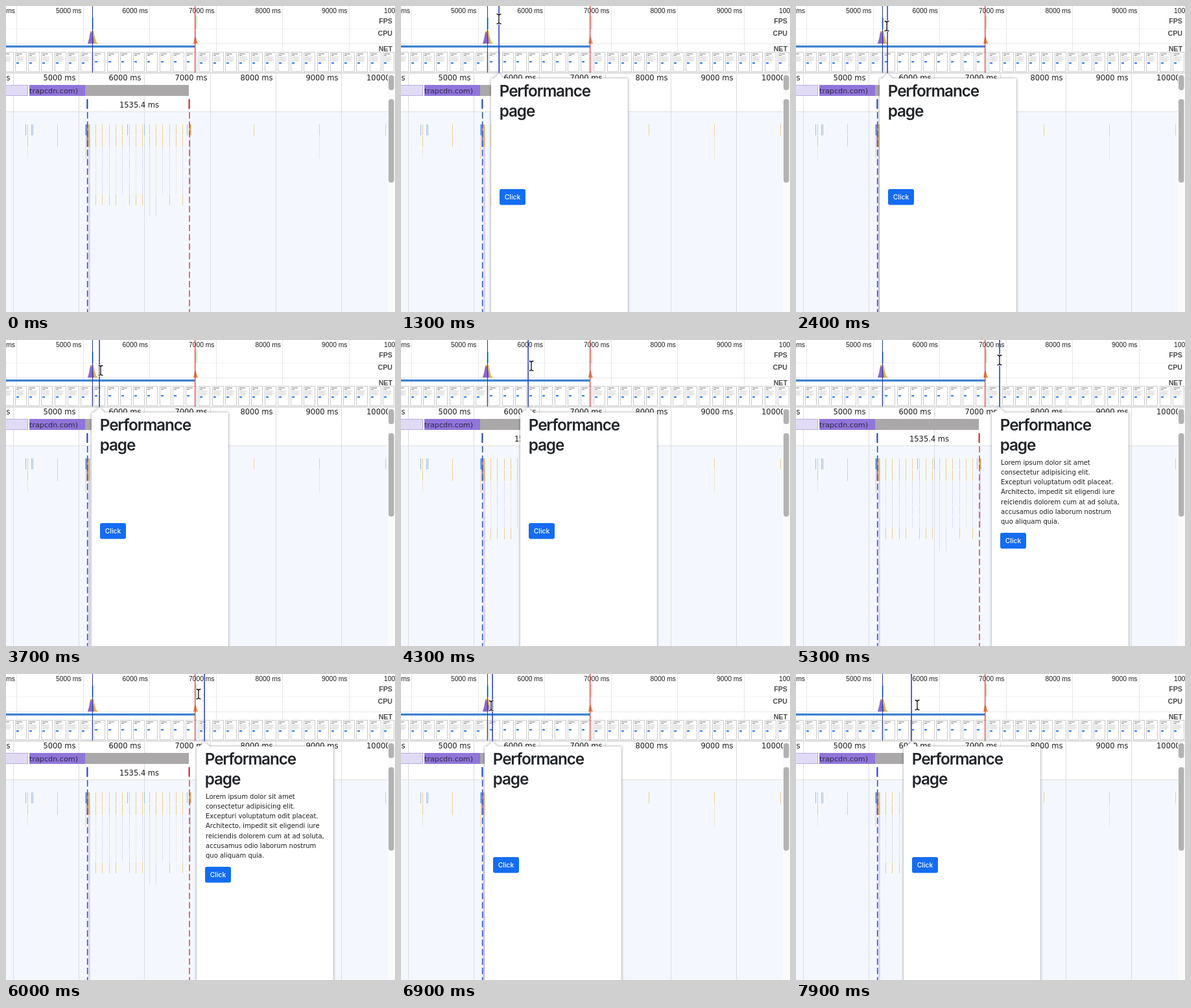
Write an HTML page with a canvas that moves like this. It is 600 by 473 pixels and loops after 8 s.

```html
<!DOCTYPE html>
<html lang="en">
<head>
<meta charset="utf-8">
<title>Performance timeline</title>
<style>
html, body { margin: 0; width: 100%; height: 100%; overflow: hidden; background: #fff; }
canvas { display: block; }
</style>
</head>
<body>
<canvas id="stage" width="600" height="473"></canvas>
<script>
const stage = document.getElementById('stage');
const LOOP = 8000, STEP = 100, SWITCH_X = 292;
const UI = '"DejaVu Sans", sans-serif';
const SANS = '"Liberation Sans", Arial, sans-serif';
const PAGE = 'Inter, sans-serif';
const INK = '#1c1c1c';
const ORANGE = '#eccd92', BLUE = '#9dbbe0', LILAC = '#dcdfee';
const PARAGRAPH = [
  'Lorem ipsum dolor sit amet', 'consectetur adipisicing elit.',
  'Excepturi voluptatum odit placeat.', 'Architecto, impedit sit eligendi iure',
  'reiciendis dolorem cum at ad soluta,', 'accusamus odio laborum nostrum',
  'quo aliquam quia.'
];

// time, hover line x, pointer x, pointer y
const PATH = [
  [700, 180, 182, 5], [1500, 141, 141, 25], [2400, 141, 140, 31],
  [3700, 144, 146, 47], [4000, 150, 157, 44], [4800, 272, 274, 33],
  [5400, 322, 322, 30], [5700, 325, 324, 30], [6000, 306, 297, 31],
  [6600, 145, 142, 46], [6900, 141, 139, 49], [7300, 141, 141, 49],
  [7900, 178, 187, 48]
];

let c = stage.getContext('2d');

function rect(x, y, w, h, color) {
  c.fillStyle = color;
  c.fillRect(x, y, w, h);
}

function round(x, y, w, h, r, color) {
  c.fillStyle = color;
  c.beginPath();
  c.roundRect(x, y, w, h, r);
  c.fill();
}

function poly(points, color) {
  c.fillStyle = color;
  c.beginPath();
  points.forEach(([x, y]) => c.lineTo(x, y));
  c.fill();
}

function text(s, x, y, font, color = INK, align = 'left', spacing = 0) {
  c.font = font;
  c.fillStyle = color;
  c.textAlign = align;
  c.letterSpacing = spacing + 'px';
  c.fillText(s, x, y);
}

function dashes(x, color) {
  c.strokeStyle = color;
  c.lineWidth = 1.6;
  c.setLineDash([10, 4.5]);
  c.beginPath();
  c.moveTo(x, 164);
  c.lineTo(x, 473);
  c.stroke();
  c.setLineDash([]);
}

function thumbnail(i) {
  const x = Math.round(-6.4 + i * 20.25), loading = i > 6 && i < 15;
  rect(x, 71, 18, 31, '#cacaca');
  rect(x + 1, 72, 16, 29, '#fff');
  rect(x + 2, 73.5, 9, 1, '#777');
  rect(x + 2, 76, 4, 1, '#888');
  if (!loading) for (let k = 0; k < 4; k++) rect(x + 2, 78.5 + k * 2, 12 - k % 2 * 2, 1, '#d2d2d2');
  rect(x + 2, loading ? 85 : 87, 4, 2.4, '#4186e8');
}

function overview() {
  for (let i = 0; i < 6; i++) {
    const x = 16 + i * 102.5;
    rect(Math.round(x), 0, 1, 70, '#e6e6e6');
    text(4000 + i * 1000 + ' ms', x - 2, 11, '10.3px ' + SANS, INK, 'right');
  }
  text('10000 ms', 583, 11, '10.3px ' + SANS);
  rect(0, 35, 600, 1, '#f0f0f0');
  rect(0, 58, 600, 1, '#e8e8e8');

  poly([[126, 58], [129, 50], [130, 39], [135, 38], [137, 48], [139, 55], [142, 58]], '#e2b64f');
  poly([[126, 58], [128, 51], [130, 41], [132, 40], [135, 49], [136, 58]], '#8b68ce');
  poly([[289, 58], [291, 48], [293, 48], [294, 53], [296, 58]], '#e08a55');
  rect(132.5, 18, 2.5, 18, '#6fc4dc');
  rect(292, 15, 3, 20, '#dde2cb');
  rect(0, 61, 292, 3, '#3f82d0');
  rect(0, 64, 292, 1, '#cfe1f5');

  for (let i = 0; i < 30; i++) thumbnail(i);
  rect(0, 103, 600, 1, '#bcbcbc');
  rect(133, 0, 1, 103, '#24389a');
  rect(291, 0, 1.3, 103, '#d8423f');
  [['FPS', 27], ['CPU', 46], ['NET', 69.5]].forEach(([s, y]) =>
    text(s, 596, y, 'bold 10.7px ' + SANS, '#4c4c4c', 'right'));
}

function flames() {
  const bar = (x, row, color, rows = 1, w = 1) => rect(x, 183 + row * 18, w, rows * 18 - 1, color);
  [33, 79, 382, 483, 585].forEach(x => bar(x, 0, ORANGE));
  [33, 79].forEach(x => bar(x, 1, ORANGE));
  [33, 483].forEach(x => bar(x, 2, '#f0e6d2'));
  bar(483, 1, '#f0e6d2');
  [30, 39, 41].forEach(x => bar(x, 0, BLUE));

  for (let i = 0; i < 14; i++) {
    const x = Math.round(138 + i * 10.33);
    bar(x, 0, ORANGE);
    bar(x, 1, ORANGE);
    for (let row = 2; row < 6; row++) bar(x, row, i % 3 ? LILAC : '#ece6dd');
    if ([0, 1, 2, 3, 5, 6, 7, 11, 13].includes(i)) bar(x, 6, ORANGE);
    if (i === 8 || i === 9) bar(x, 6, LILAC, 2);
  }
  [187, 213, 279].forEach(x => bar(x, 0, BLUE));

  rect(127, 200, 3, 273, '#e2e1f4');
  for (let row = 1; row < 16; row++) bar(127.5, row, row % 4 ? '#d9cdef' : '#f2d8df', 1, 2);
  bar(122.5, 0, '#4f92ce', 1, 2);
  bar(124.5, 0, '#8267cf', 2, 2);
  bar(127, 0, '#e5b860', 2, 2.5);
  bar(122.5, 1, ORANGE, 2);
  bar(282, 0, '#dfab62', 1, 3);
  bar(285, 0, '#cbd5ab');
  bar(283, 1, '#dedbea', 5, 2);
}

function timeline() {
  rect(0, 164, 589, 309, '#f4f8fe');
  rect(0, 163, 589, 1, '#dfdfdf');
  for (let i = 0; i < 6; i++) {
    const x = 11 + Math.round(i * 101.2);
    rect(x, 105, 1, 368, '#d9dce1');
    text(4000 + i * 1000 + ' ms', x - 4.5, 115, '11.5px ' + UI, INK, 'right');
  }
  c.save();
  c.beginPath();
  c.rect(0, 104, 589, 20);
  c.clip();
  text('10000 ms', 556, 115, '11.5px ' + UI);
  c.restore();

  rect(0, 122, 34, 17, '#b9abdf');
  rect(0, 123, 33, 15, '#e2dbf6');
  rect(36, 122, 86, 17, '#9075da');
  rect(122, 122, 160, 17, '#aaa8a8');
  text('trapcdn.com)', 36, 135, '11.2px ' + UI, '#2c2640');

  text('1535.4 ms', 205.5, 157, '11.5px ' + UI, INK, 'center');
  rect(124.3, 144, 2.2, 15, '#2448c8');
  rect(281.5, 144, 2.2, 15, '#c9302f');
  flames();
  dashes(125.7, '#2f52cd');
  dashes(283, '#dd4a48');

  rect(589, 105, 11, 368, '#fbfbfb');
  round(590, 107, 8.5, 23, 4, '#b2b2b2');
  round(590, 144, 8.5, 129, 4, '#b2b2b2');
}

function popup(x) {
  const left = x - 12;
  c.save();
  c.shadowColor = 'rgba(0,0,0,.4)';
  c.shadowBlur = 4;
  rect(left, 112, 210.5, 380, '#fff');
  poly([[x - 8, 112], [x, 104.5], [x + 8, 112]], '#fff');
  c.restore();
  rect(left, 112, 210.5, 361, '#fff');

  ['Performance', 'page'].forEach((s, i) =>
    text(s, x + .8, 140 + i * 31, '600 24.3px ' + PAGE, '#212529', 'left', -1.15));
  const loaded = x > SWITCH_X, top = loaded ? 298 : 283;
  if (loaded) PARAGRAPH.forEach((s, i) => text(s, x + 2, 192.5 + i * 15.3, '10px ' + UI, INK));
  round(x + 1, top, 40, 24.5, 3, '#146cf2');
  text('Click', x + 21, top + 16, '500 10.4px ' + PAGE, '#fff', 'center');
}

function pointer(x, y) {
  c.lineCap = 'round';
  [['#fff', 3.2], ['#111', 1.3]].forEach(([color, width]) => {
    c.strokeStyle = color;
    c.lineWidth = width;
    c.beginPath();
    for (const s of [-1, 1]) {
      c.moveTo(x - 3, y + 7.5 * s);
      c.quadraticCurveTo(x, y + 7.5 * s, x, y + 5 * s);
      c.quadraticCurveTo(x, y + 7.5 * s, x + 3, y + 7.5 * s);
    }
    c.moveTo(x, y - 5);
    c.lineTo(x, y + 5);
    c.stroke();
  });
  c.lineCap = 'butt';
}

function pose(t) {
  const i = PATH.findIndex(key => key[0] >= t);
  if (i < 0) return PATH.at(-1).slice(1);
  if (i === 0) return t === PATH[0][0] ? PATH[0].slice(1) : null;
  const a = PATH[i - 1], b = PATH[i], k = (t - a[0]) / (b[0] - a[0]);
  return a.slice(1).map((v, j) => v + (b[j + 1] - v) * k);
}

// The timeline never changes, so it is painted once.
const screen = c, base = document.createElement('canvas');
base.width = 600;
base.height = 473;
c = base.getContext('2d');
rect(0, 0, 600, 473, '#fff');
overview();
timeline();
c = screen;

const start = performance.now();
function frame() {
  const t = Math.floor((performance.now() - start) % LOOP / STEP) * STEP;
  c.drawImage(base, 0, 0);
  const now = pose(t);
  if (now) {
    const [x, px, py] = now.map(Math.round);
    popup(x);
    rect(x - .7, 0, 1.6, 103.5, '#3044bd');
    pointer(px, py);
  }
  requestAnimationFrame(frame);
}
frame();
</script>
</body>
</html>
```
